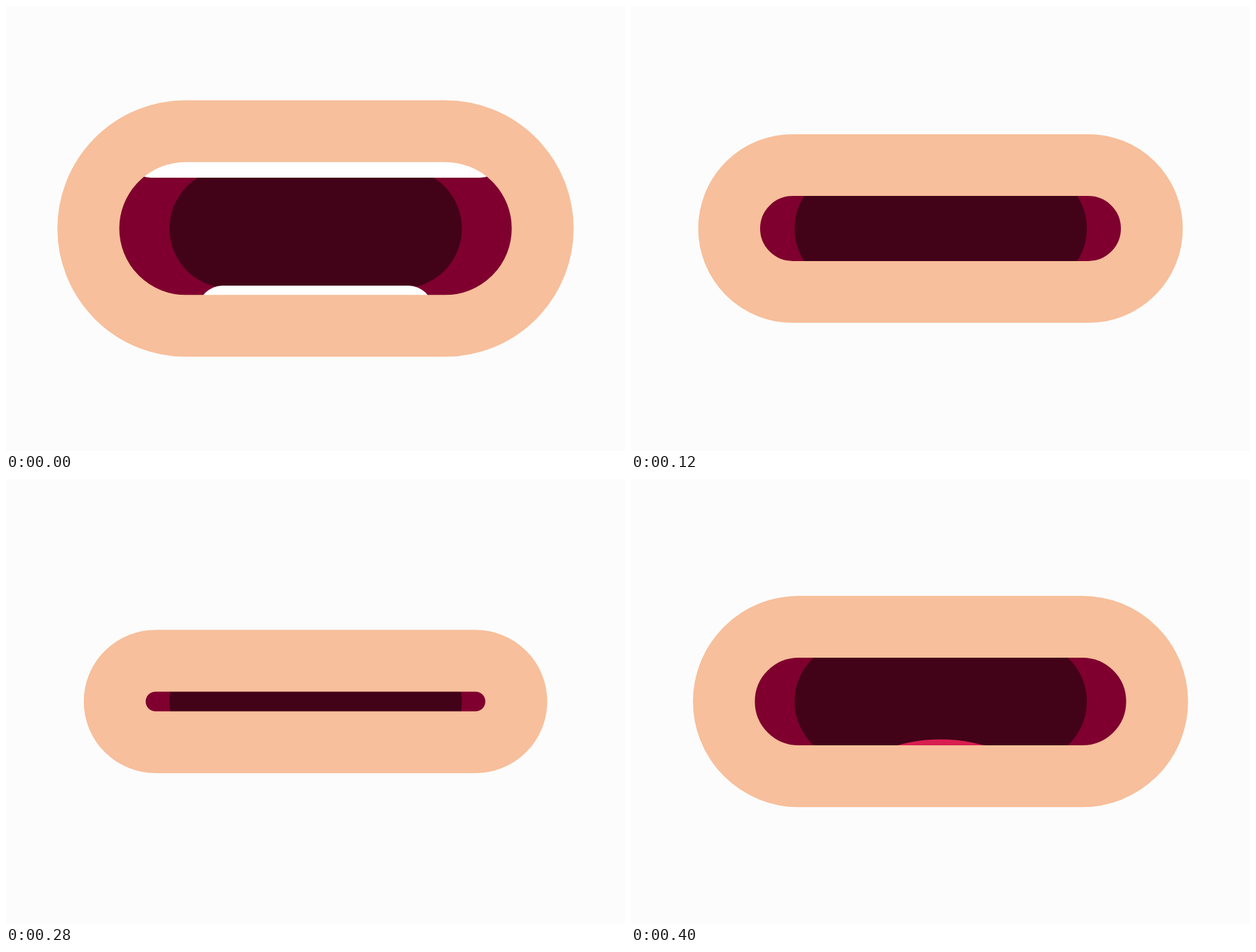
Write an HTML page that moves like this. It is 882 px wide and 635 px high and loops after 440 ms.

```html
<!DOCTYPE html>
<html lang="en">
<head>
<meta charset="utf-8">
<title>Talking mouth</title>
<style>
  html, body { margin: 0; width: 100%; height: 100%; overflow: hidden; background: #fcfcfc; }
  svg { display: block; width: 882px; height: 635px; }
</style>
</head>
<body>
<svg viewBox="0 0 882 635">
  <clipPath id="mouth"><rect class="lip"/></clipPath>
  <g clip-path="url(#mouth)">
    <rect width="882" height="635" fill="#7f002f"/>
    <rect x="233" y="232" width="416.5" height="171" rx="85.5" fill="#420218"/>
    <ellipse id="tongue" cx="441" cy="601.5" rx="230" ry="230" fill="#d81e50"/>
    <rect x="172" y="145" width="538" height="100" rx="34.5" fill="#fff"/>
    <rect x="274" y="399" width="334" height="100" rx="34.5" fill="#fff"/>
  </g>
  <rect class="lip" fill="none" stroke="#f7bf9b" stroke-width="88.2"/>
</svg>
<script>
  const STEP = 40, COUNT = 11, CLOSED = 6;
  const CX = 441, CY = 317.5;
  const lips = document.querySelectorAll('.lip');
  const tongue = document.getElementById('tongue');

  function setPill(el, halfW, halfH) {
    const box = { x: CX - halfW, y: CY - halfH, width: 2 * halfW, height: 2 * halfH, rx: halfH };
    for (const key in box) el.setAttribute(key, box[key]);
  }

  // The mouth closes evenly, opens again, and snaps wide at the loop point.
  function draw(now) {
    const step = Math.floor(now / STEP) % COUNT;
    const shut = CLOSED - Math.abs(CLOSED - step);
    lips.forEach(el => setPill(el, 323.7 - 7.52 * shut, 138.9 - 16.14 * shut));
    tongue.style.display = step === COUNT - 1 ? '' : 'none';
  }

  const start = performance.now();
  function tick() {
    draw(performance.now() - start);
    requestAnimationFrame(tick);
  }
  tick();
</script>
</body>
</html>
```
